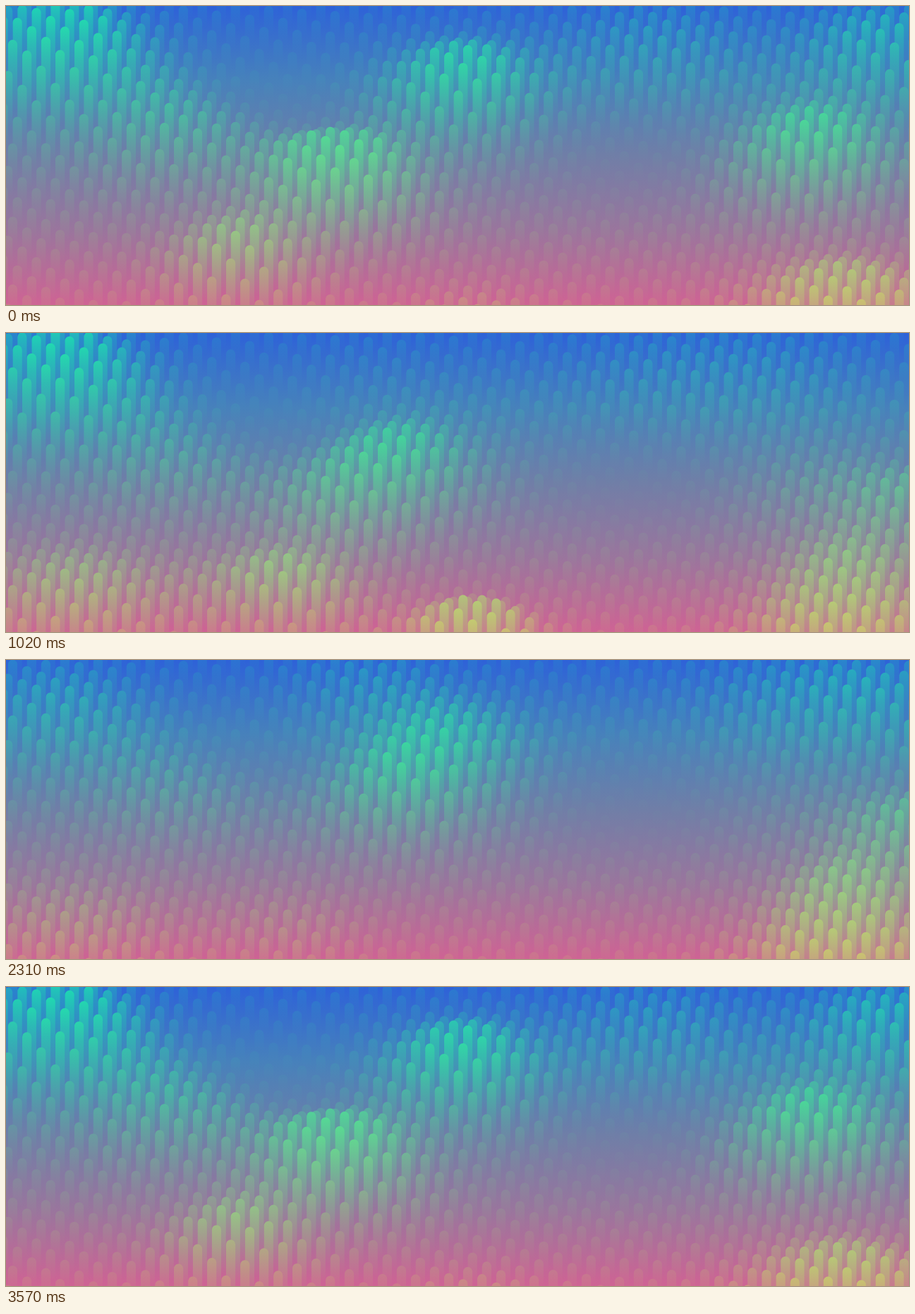
These frames come from a looping animation (1280x425 px, 3600 ms). An HTML page with a canvas:

```html
<!DOCTYPE html>
<html lang="en">
<head>
<meta charset="utf-8">
<title>Wave field</title>
<style>
html, body { margin: 0; width: 100%; height: 100%; overflow: hidden; background: #5a80b0; }
canvas { display: block; width: 1280px; height: 425px; }
</style>
</head>
<body>
<canvas id="stage" width="1280" height="425"></canvas>
<script>
const W = 1280, H = 425, LOOP = 3600, STEP = 30;
const ctx = document.getElementById('stage').getContext('2d');

// Grid of posts seen from above at an angle; ground axes follow a 3-4-5 triangle.
const UNIT = 6.72, TILT = 0.577, BAR = 13.2, FLOOR = 24;
const ORIGIN = { x: 338.7, y: 448 };

// Evenly spaced colours from the top of the stage to the bottom.
const GROUND = ['#2e62d8', '#4781bb', '#707ea7', '#9a759d', '#cf6394'].map(parse);
const TOPS = ['#1ce6ae', '#3ee896', '#82da86', '#ccd06a'].map(parse);

const swells = [];

// A row of swells from (x, y) to `to`; each one crests `sweep` degrees after the last.
// `rest` is the share of the height that never ebbs.
function swell({ x, y, to = [x, y], count = 1, r, h, peak = 0, sweep = 0, rest = 0 }) {
  for (let i = 0; i < count; i++) {
    const k = count > 1 ? i / (count - 1) : 0;
    swells.push({
      x: x + (to[0] - x) * k, y: y + (to[1] - y) * k,
      r, h, rest, peak: (peak + sweep * i) / 360
    });
  }
}

// Centre: a crest climbing to the upper right
swell({ x: 470, y: 294, to: [645, 160], count: 3, r: 82, h: 88, peak: 20, sweep: 147 });
// Left
swell({ x: 75, y: 112, r: 92, h: 92, peak: 50, rest: 0.4 });
swell({ x: 240, y: 215, r: 92, h: 44, rest: 0.6 });
swell({ x: 95, y: 425, r: 100, h: 72, peak: 150 });
// Bottom
swell({ x: 325, y: 405, to: [410, 420], count: 2, r: 72, h: 60, peak: 8, sweep: 127 });
swell({ x: 660, y: 490, r: 72, h: 88, peak: 95 });
// Right
swell({ x: 1185, y: 487, r: 100, h: 78, rest: 1 });
swell({ x: 1195, y: 385, to: [1280, 290], count: 2, r: 75, h: 72, peak: 172 });
swell({ x: 1140, y: 255, to: [1240, 105], count: 2, r: 85, h: 70, sweep: -55 });
// Top
swell({ x: 920, y: 105, r: 95, h: 36, peak: 30 });
swell({ x: 500, y: 90, to: [1090, 95], count: 2, r: 90, h: 34, peak: 205, sweep: -30 });
// Two lasting hollows
swell({ x: 370, y: 145, to: [890, 215], count: 2, r: 105, h: -20, rest: 1 });

function parse(hex) {
  return [1, 3, 5].map(i => parseInt(hex.slice(i, i + 2), 16));
}
const clamp = (v, a, b) => Math.max(a, Math.min(b, v));
const mix = (a, b, k) => a.map((v, i) => v + (b[i] - v) * k);
const rgb = c => `rgb(${c.map(Math.round)})`;

function ramp(colors, y) {
  const p = clamp(y / H, 0, 1) * (colors.length - 1);
  const i = Math.min(Math.floor(p), colors.length - 2);
  return mix(colors[i], colors[i + 1], p - i);
}

function makePosts() {
  const posts = [];
  for (let m = -60; m <= 60; m++) {
    for (let n = -60; n <= 60; n++) {
      const x = ORIGIN.x + UNIT * (3 * m + 4 * n);
      const y = ORIGIN.y + UNIT * TILT * (4 * m - 3 * n);
      if (x < -10 || x > W + 10 || y < -10 || y > H + 130) continue;
      const near = swells.map(s => {
        const dx = (x - s.x) / s.r, dy = (y - s.y) / (s.r * TILT);
        return Math.exp(-(dx * dx + dy * dy) / 2);
      });
      posts.push({ x, y, near });
    }
  }
  return posts.sort((a, b) => a.y - b.y);
}

const posts = makePosts();
const backdrop = ctx.createLinearGradient(0, 0, 0, H);
GROUND.forEach((c, i) => backdrop.addColorStop(i / (GROUND.length - 1), rgb(c)));

function level({ h, peak, rest }, t) {
  const wave = 0.5 + 0.5 * Math.cos(2 * Math.PI * (t / LOOP - peak));
  return h * (rest + (1 - rest) * Math.pow(wave, 1.4));
}

function drawPost(x, y, h) {
  const top = y - h, len = h + 18, r = BAR / 2;
  if (top > H || top + len < 0) return;
  const power = Math.min(0.95, Math.pow(h / 100, 1.3));
  const tint = ramp(TOPS, top);
  const shade = ctx.createLinearGradient(0, top, 0, top + len);
  for (let u = 0; u <= 1; u += 0.25) {
    const fade = power * Math.pow(1 - u, 1.2);
    shade.addColorStop(u, rgb(mix(ramp(GROUND, top + len * u), tint, fade)));
  }
  ctx.fillStyle = shade;
  ctx.beginPath();
  ctx.moveTo(x - r, top + len);
  ctx.lineTo(x - r, top + r);
  ctx.arc(x, top + r, r, Math.PI, 0);
  ctx.lineTo(x + r, top + len);
  ctx.fill();
}

function draw(t) {
  const levels = swells.map(s => level(s, t));
  ctx.fillStyle = backdrop;
  ctx.fillRect(0, 0, W, H);
  for (const { x, y, near } of posts) {
    let h = levels.reduce((sum, v, i) => sum + v * near[i], FLOOR);
    if (h > 85) h = 85 + (h - 85) * 0.45;
    if (h > 1) drawPost(x, y, h);
  }
}

let last = -1;
function tick(now) {
  const t = Math.floor((now % LOOP) / STEP) * STEP;
  if (t !== last) draw(last = t);
  requestAnimationFrame(tick);
}
draw(0);
requestAnimationFrame(tick);
</script>
</body>
</html>
```
